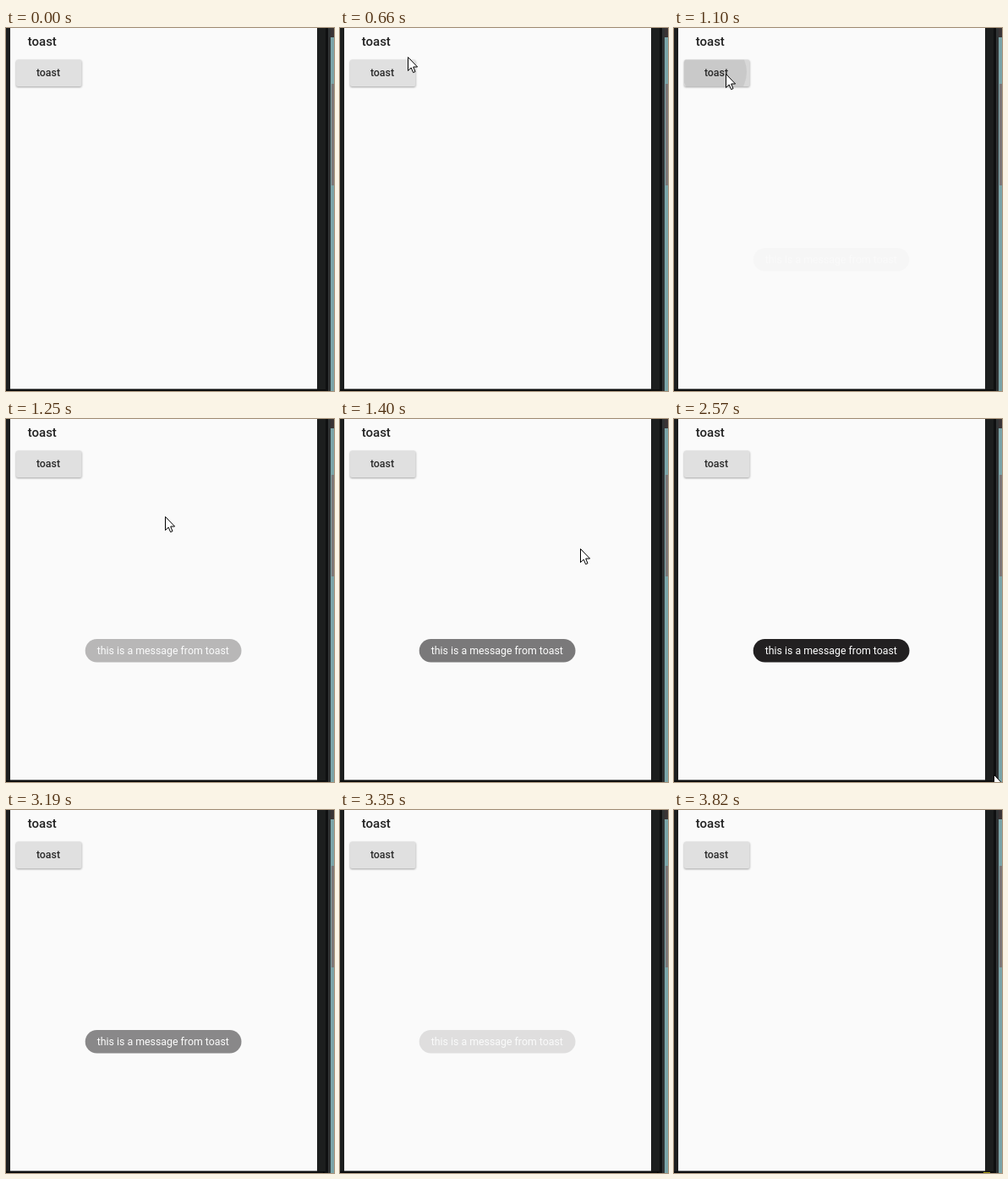
Animation, 388 px wide and 429 px high, one loop 3.89 s. Source, as an HTML page:

```html
<!DOCTYPE html>
<html lang="en">
<head>
<meta charset="utf-8">
<title>toast</title>
<style>
  html, body { margin: 0; width: 100%; height: 100%; overflow: hidden; background: #1c1e1e; }
  svg { display: block; width: 388px; height: 429px; font-family: Roboto, sans-serif; }
  #button { filter: drop-shadow(0 1px 1px rgba(0, 0, 0, .35)); }
</style>
</head>
<body>
<svg viewBox="0 0 388 429">
  <defs>
    <clipPath id="face"><rect x="12" y="37.5" width="77.5" height="31.5" rx="2"/></clipPath>
  </defs>

  <!-- phone body and desktop edge -->
  <rect width="388" height="429" fill="#1c1e1e"/>
  <rect x="378" width="3" height="429" fill="#0f1011"/>
  <rect x="381" width="3" height="429" fill="#303334"/>
  <rect x="384" width="4" height="429" fill="#7ba5a9"/>
  <rect x="384" width="4" height="11" fill="#3a3435"/>
  <rect x="385" y="66" width="3" height="120" fill="#7d7879"/>
  <rect y="427" width="378" height="2" fill="#0c0d0d"/>
  <rect x="5" width="363" height="426.5" fill="#fafafa"/>

  <text x="25.7" y="21" font-size="15" font-weight="500" fill="#212121">toast</text>

  <rect id="button" x="12" y="37.5" width="77.5" height="31.5" rx="2" fill="#e0e0e0"/>
  <g id="press" clip-path="url(#face)">
    <rect x="11" y="37" width="79" height="33" opacity=".035"/>
    <circle id="ripple" cx="48" cy="52" opacity=".07"/>
  </g>
  <text x="50" y="57" font-size="12.4" font-weight="500" text-anchor="middle" fill="#2b2b2b">toast</text>

  <g id="toast">
    <rect x="93.7" y="260" width="184.8" height="27.6" rx="13.8" fill="#222021"/>
    <text x="185.8" y="278" font-size="12.35" text-anchor="middle" fill="#fff">this is a message from toast</text>
  </g>

  <rect id="glow" x="366" y="428" width="8" height="1" fill="#a89b12"/>
  <path id="cursor" d="M.5 .5V16.5L4.2 13 6.6 18.6 9 17.6 6.7 12H11.6Z" fill="#fff" stroke="#000"/>
</svg>
<script>
const LOOP = 3890, STEP = LOOP / 50;
const $ = id => document.getElementById(id);
const ramp = (t, start, length) => Math.min(1, Math.max(0, (t - start) / length));
const show = (id, on) => $(id).setAttribute('visibility', on ? 'visible' : 'hidden');

// Pointer stops: [time, x, y]
const stops = [
  [80, 309, 400], [550, 80, 34], [660, 80, 34], [940, 61, 54], [1100, 61, 54],
  [1174, 140, 96], [1408, 284, 153], [1720, 317, 306], [1953, 317, 316],
  [2030, 309, 330], [2420, 376, 415], [2575, 378, 420], [3198, 375, 427]
];

function pointAt(t) {
  let [, x, y] = stops[0];
  for (let i = 1; i < stops.length; i++) {
    const [t0] = stops[i - 1], [t1, x1, y1] = stops[i];
    const k = ramp(t, t0, t1 - t0);
    x += (x1 - x) * k;
    y += (y1 - y) * k;
  }
  return [x, y].map(Math.round);
}

function draw(now) {
  // The screen refreshes 50 times per loop
  const t = (Math.floor(now % LOOP / STEP + .1) + .1) * STEP;

  $('cursor').setAttribute('transform', `translate(${pointAt(t)})`);
  show('cursor', t > 70 && t < 3400);

  show('press', t > 940 && t < 1150);
  $('ripple').setAttribute('r', 5 + 33 * ramp(t, 940, 150));

  $('toast').setAttribute('opacity', ramp(t, 1090, 540) * (1 - ramp(t, 3010, 390)));

  show('glow', t > 3810);
  requestAnimationFrame(draw);
}
requestAnimationFrame(draw);
</script>
</body>
</html>
```
